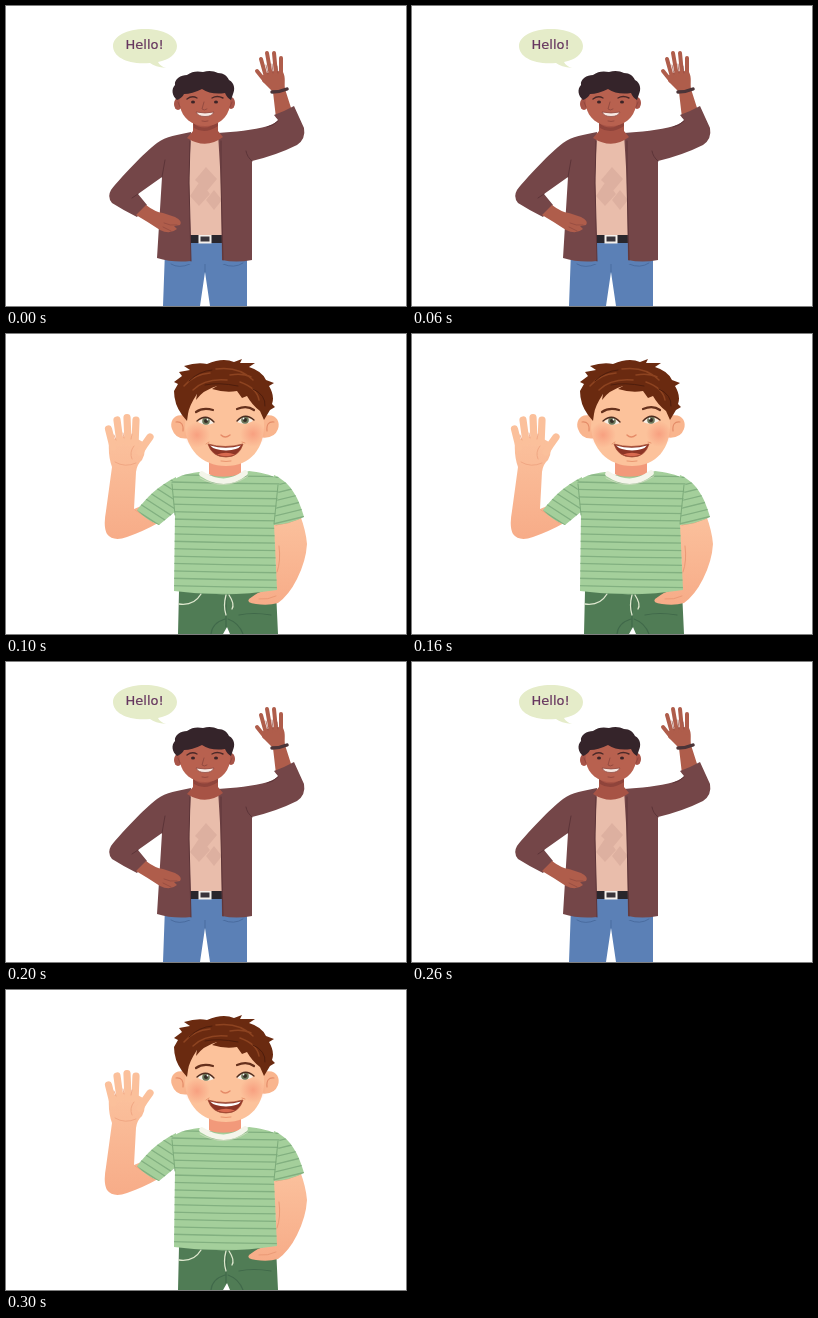
Animation of 400x300 px, one loop 0.4 s. Source, as an HTML page:

```html
<!DOCTYPE html>
<html lang="en">
<head>
<meta charset="utf-8">
<title>Waving hello</title>
<style>
  html, body { margin: 0; width: 100%; height: 100%; overflow: hidden; background: #fff; }
  svg { display: block; width: 100vw; height: 100vh; }
  text { font: 13px "DejaVu Sans", sans-serif; }
  .line { fill: none; stroke-linecap: round; stroke-linejoin: round; }
</style>
</head>
<body>
<svg viewBox="0 0 400 300">
  <defs>
    <linearGradient id="armTint" x1="0" y1="0" x2="0" y2="1">
      <stop offset="0" stop-color="#fbc19d"/><stop offset="1" stop-color="#f7ac88"/>
    </linearGradient>
    <radialGradient id="blush">
      <stop offset="0" stop-color="#f58e72" stop-opacity=".65"/><stop offset="1" stop-color="#f58e72" stop-opacity="0"/>
    </radialGradient>
    <clipPath id="teeBody"><path d="M193 138C178 140 169 143 165 149L169 181L168 257Q220 264 271 256L268 190L274 146C265 140 252 138 243 137Q219 148 193 138Z"/></clipPath>
    <clipPath id="teeLeft"><path d="M170 143C152 152 141 163 131 176Q140 186 153 191L170 177Z"/></clipPath>
    <clipPath id="teeRight"><path d="M268 141C286 149 293 166 298 183Q284 190 268 191L264 170Z"/></clipPath>
  </defs>

  <g id="man">
    <path fill="#e5ecc9" d="M139 23C157 23 171 30 171 40C171 48 163 54 152 56Q154 60 160 62Q149 61 144 57C122 59 107 51 107 40C107 30 121 23 139 23Z"/>
    <text x="119.5" y="43" fill="#66365f" stroke="#66365f" stroke-width=".2">Hello!</text>

    <!-- jeans and belt -->
    <path fill="#5b80b6" d="M159 245H241V300H204L199 266L194 300H157Z"/>
    <path class="line" stroke="#4a6c9f" d="M199 238V266M165 258Q173 263 184 258M217 258Q228 263 237 257"/>
    <path fill="#5b80b6" d="M182 236H218V258H182Z"/>
    <path fill="#29262c" d="M183 229H217V237H183Z"/>
    <rect x="193.5" y="229.5" width="11" height="7" fill="#39343a" stroke="#f5f0eb" stroke-width="2"/>

    <!-- tee -->
    <path fill="#e9bdab" d="M180 132H218V229H182Z"/>
    <path fill="#d9ac9c" d="M200 161L211 173L201 185L189 174ZM194 175L204 188L193 200L184 190ZM208 184L216 194L208 204L200 194Z" opacity=".7"/>

    <!-- raised hand -->
    <path fill="#af5d4b" d="M256 70Q266 63 277 66C280 72 278 77 279 83L286 105L270 112L267 86Q261 80 256 75Z"/>
    <path class="line" stroke="#af5d4b" stroke-width="4" d="M259 75L251 65M260 71L255 53M265 70L261 47M270 68L268 47M275 71L275 52"/>
    <path class="line" stroke="#944b40" stroke-width=".7" d="M262 68L260 59M267 67L266 58M272 67L271 60"/>
    <path class="line" stroke="#4b3438" stroke-width="3.5" stroke-linecap="butt" d="M266 86Q274 86 281 83"/>

    <!-- jacket -->
    <path fill="#744648" d="M185 126C172 129 160 130 151 137C138 147 117 169 105 184Q101 191 106 197Q117 204 131 211L141 199L132 188L156 171L151 252Q167 257 185 255L183 170Z"/>
    <path fill="#744648" d="M212 127C228 126 247 124 262 120Q270 117 272 114L268 109Q279 105 288 100L298 122Q300 133 291 139Q271 149 246 155L246 254Q230 257 216 254L215 178Z"/>
    <path class="line" stroke="#5c3438" d="M156 171L159 154M184 135L183 177L185 255M215 135L215 177L217 254M246 155Q241 151 240 145M272 115Q267 120 261 121M132 188L126 192"/>

    <!-- hand on hip -->
    <path fill="#af5d4b" d="M140 199Q149 206 157 207L169 211Q177 215 174 219L168 220L171 223Q164 229 154 224Q142 216 130 209Z"/>
    <path class="line" stroke="#944b40" stroke-width=".8" d="M158 217Q164 220 171 219M157 221L165 225"/>

    <!-- neck and head -->
    <path fill="#a75345" d="M187 113H212V125L217 131Q200 144 181 132L187 125Z"/>
    <path fill="#8f443b" d="M187 117Q199 127 212 115V120Q199 129 188 122Z"/>
    <ellipse cx="172" cy="98" rx="4" ry="6" fill="#a85448"/>
    <ellipse cx="225" cy="97" rx="4" ry="6" fill="#a85448"/>
    <path fill="#b8614f" d="M173 84Q198 73 225 84L224 99C222 113 211 120 199 120C186 120 176 112 174 100Z"/>
    <path fill="#35242a" d="M171 94C166 90 165 83 169 79C168 73 175 69 181 69C186 65 192 65 197 66C203 64 208 65 212 67C218 67 221 70 223 74C229 77 229 84 227 88L225 94Q221 92 219 87Q205 89 196 83Q186 88 178 88Q176 92 171 94Z"/>
    <g class="line" stroke="#4b2928">
      <path stroke-width="1.400" d="M181 93Q186 89 191 92M206 92Q211 89 217 92"/>
      <path stroke="#944b40" stroke-width="1" d="M198 96L196 103Q198 105 201 103"/>
      <path stroke="#8f443b" stroke-width=".8" d="M196 115Q199 116 202 115M172 96L174 101M226 96L224 101"/>
    </g>
    <ellipse cx="187" cy="96" rx="2" ry="1.500" fill="#3c2427"/>
    <ellipse cx="210" cy="96" rx="2" ry="1.500" fill="#3c2427"/>
    <path fill="#f7e9e3" stroke="#8a443b" stroke-width=".7" d="M190 106Q199 108 208 106Q206 110.500 199 110.500Q192 110.500 190 106Z"/>
  </g>

  <g id="boy">
    <!-- raised arm -->
    <path fill="url(#armTint)" d="M103 108Q119 97 137 108Q141 117 136 126Q131 130 130 138L128 175L145 168L152 189Q138 197 121 203Q107 208 101 200Q97 193 100 177Q103 155 106 133Q102 122 103 108Z"/>
    <path class="line" stroke="#fbc09b" stroke-width="7.200" d="M107 113L102.500 95M114 108L111 86M122 108L121 83.500M129 110L130 86M134 118Q138 111 144 103"/>
    <path class="line" stroke="#eea17e" stroke-width=".8" d="M110 106L108 101M118 104L117 99M125 105L126 100M109 128Q119 134 130 129M128 112Q123 118 126 125M129 176Q138 181 147 189"/>

    <!-- trousers -->
    <path fill="#507c55" d="M173 257H270L272 300H224L221 293L217 300H172Z"/>
    <path class="line" stroke="#40694a" stroke-width="1.200" d="M220 262V293M205 300Q206 289 219 285M237 300Q233 289 222 285M233 281Q247 278 265 281"/>
    <path class="line" stroke="#dfe8cf" stroke-width="1.300" d="M173 270Q188 272 195 260M220 261Q217 272 220 281M223 261Q229 270 226 275"/>

    <!-- lowered arm -->
    <path fill="url(#armTint)" d="M267 186L294 181Q300 197 301 210Q300 227 291 245Q283 261 272 269Q262 272 250 270Q240 269 243 265Q253 257 264 255L270 240Z"/>
    <path class="line" stroke="#eb9a76" stroke-width="1" d="M273 212Q275 227 271 238M253 265Q262 266 270 262M270 191Q282 190 295 184"/>

    <!-- neck -->
    <path fill="#f2997a" d="M203 125H235V139Q219 151 203 140Z"/>

    <!-- striped tee -->
    <g id="tee"></g>
    <path class="line" stroke="#7cab7a" stroke-width="1" d="M166 150L169 181M272 151L268 190"/>
    <path class="line" stroke="#f4f5ea" stroke-width="5.500" d="M196 140Q219 155 239 139"/>
    <path class="line" stroke="#d7dfc7" stroke-width=".7" d="M194 144Q219 158 242 142"/>

    <!-- head -->
    <path fill="#f9b58e" d="M182 83C169 77 163 87 166 95Q170 107 184 104ZM255 83C269 77 275 87 272 95Q268 106 253 103Z"/>
    <path class="line" stroke="#e48c68" stroke-width="1.200" d="M170 88Q178 87 177 97M268 88Q260 87 261 97"/>
    <path fill="#fcc29b" d="M180 76Q194 42 244 53Q257 66 258 88C259 115 244 132 220 132C195 132 180 114 179 93Z"/>
    <circle cx="191" cy="101" r="13" fill="url(#blush)"/>
    <circle cx="247" cy="100" r="13" fill="url(#blush)"/>
    <path fill="#6a2a10" d="M181 87L176 81Q168 70 168 57L172 50L168 48L176 42L173 38L184 36L178 32Q191 28 201 30Q217 23 228 28L236 25L234 29L249 29L243 33Q256 37 260 46L268 49L263 52Q269 62 266 70L269 73L264 76L258 86L254 77Q246 71 241 62L236 64L231 57Q219 59 206 55L211 52Q197 56 190 66L191 60Q183 72 182 80Z"/>
    <path class="line" stroke="#8d4320" stroke-width="1.500" d="M178 52Q188 40 204 39M187 56Q199 44 221 46M210 35Q233 32 247 46M234 48Q251 54 253 66M224 41Q237 39 245 43"/>
    <path class="line" stroke="#4e1d0c" stroke-width="1" d="M183 47Q193 37 206 36M199 51Q212 48 232 52M247 55Q260 61 259 72"/>

    <!-- features -->
    <path class="line" stroke="#65301c" stroke-width="2.200" d="M190 78Q197 73 207 76M231 75Q241 71 248 76"/>
    <g id="eye">
      <path fill="#f5eee5" d="M192 88Q200 80 208 89Q200 93 192 88Z"/>
      <circle cx="200" cy="87" r="3.800" fill="#6b775a"/>
      <circle cx="200" cy="87" r="2" fill="#342c24"/>
      <circle cx="201.500" cy="85.500" r=".9" fill="#fff"/>
      <path class="line" stroke="#4c2c20" stroke-width="1.300" d="M191 87Q200 79 208 88"/>
    </g>
    <use href="#eye" transform="matrix(-1 0 0 1 439 -1)"/>
    <path class="line" stroke="#e58b68" stroke-width="1.400" d="M215 101Q219 105 224 101"/>
    <path fill="#8d3526" stroke="#a64f38" stroke-width=".8" d="M202 110Q219 115 237 110Q233 123 220 123Q206 123 202 110Z"/>
    <path fill="#fff" d="M204 111.500Q220 116 235 111.500Q232 116 220 116.500Q208 116 204 111.500Z"/>
    <path fill="#d9694f" d="M211 120.500Q220 117 229 120.500Q220 124 211 120.500Z"/>
    <path class="line" stroke="#e9956f" stroke-width="1" d="M200 110L203 108M236 108L239 109M215 127Q220 128 225 127"/>
  </g>
</svg>
<script>
  // Each cloth panel: clip name, tilt of its stripes, and the pivot of that tilt.
  const panels = [
    ["teeLeft", 32, 150, 168],
    ["teeRight", -13, 282, 168],
    ["teeBody", 1, 220, 200],
  ];
  const stripes = Array.from({ length: 25 }, (_, i) =>
    `<path d="M100 ${96 + i * 7.4}Q220 ${99 + i * 7.4} 340 ${96 + i * 7.4}"/>`).join("");
  document.getElementById("tee").innerHTML = panels.map(([clip, tilt, x, y]) =>
    `<g clip-path="url(#${clip})"><rect x="100" y="120" width="220" height="160" fill="#a4cf9b"/>
     <g class="line" stroke="#82b080" stroke-width="1.3" transform="rotate(${tilt} ${x} ${y})">${stripes}</g></g>`).join("");

  const poses = { man: [1, 0], boy: [0, 1] };
  for (const [id, [first, second]] of Object.entries(poses)) {
    const animation = document.getElementById(id).animate([
      { opacity: first, offset: 0, easing: "step-end" },
      { opacity: second, offset: 0.5, easing: "step-end" },
      { opacity: first, offset: 1 },
    ], { duration: 200, iterations: Infinity });
    animation.startTime = 0;
  }
</script>
</body>
</html>
```
